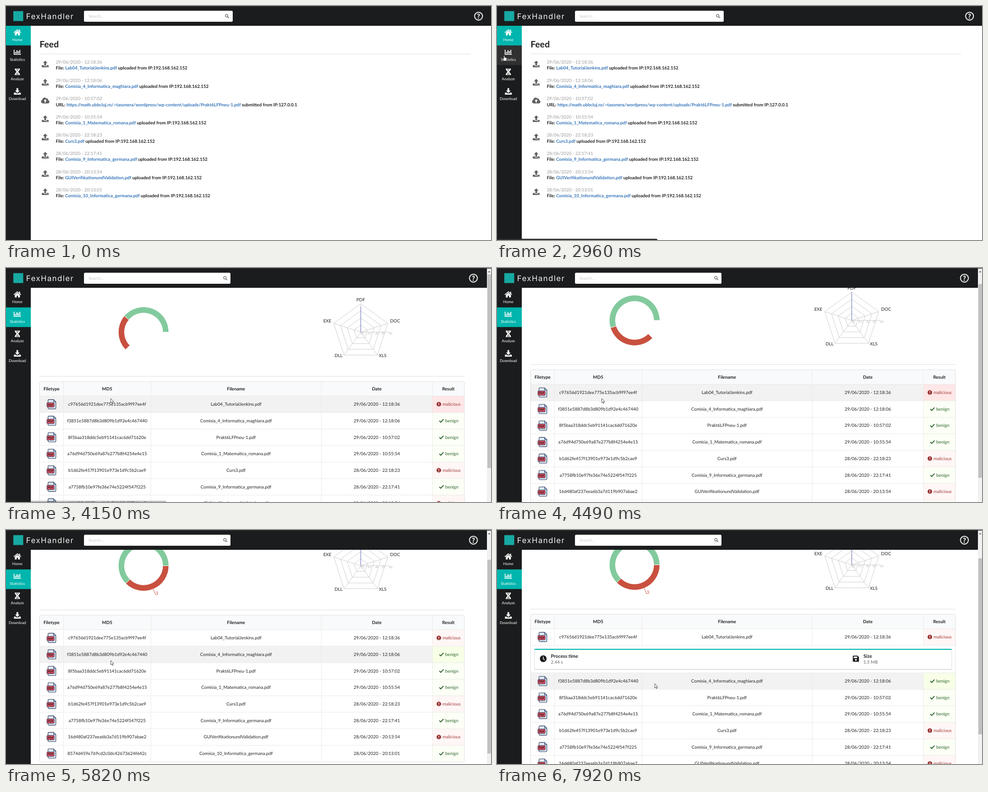
An HTML page for the animation above (8 s loop, 1076 by 520 pixels).

```html
<!DOCTYPE html>
<html lang="en">
<head>
<meta charset="utf-8">
<title>Feed and statistics</title>
<style>
html, body { margin: 0; width: 100%; height: 100%; overflow: hidden; background: #fff; }
svg { display: block; }
text { font: 9.9px Lato, sans-serif; fill: rgba(0,0,0,.87); text-rendering: geometricPrecision; }
.b { font-weight: 700; }
.m { text-anchor: middle; }
.e { text-anchor: end; }
.link { fill: #3675b8; }
.date { fill: rgba(0,0,0,.4); }
.side { font-size: 8.5px; fill: #fff; }
</style>
</head>
<body>
<svg id="stage" width="1076" height="520" viewBox="0 0 1076 520"></svg>
<script>
const LOOP = 8000, ROW = 36.7, TOP = 284.5, EXTRA = 61.2;
const HEAD = 44, SIDE = 55;
const GREEN = '#82ca9d', RED = '#c9503f', TEAL = '#00b5ad', DARK = '#1b1c1d';
const COLS = [127.5, 321.5, 699.5, 946];
const PIE = { x: 305.2, y: 142.5, r: 56, hole: 42.5 };
const NET = { x: 787, y: 142.5, r: 63 };

const files = [
  ['Lab04_TutorialJenkins.pdf', '29/06/2020 - 12:18:36', 'c97656d1921dee775e135acb9f97ee4f', 1],
  ['Comisia_4_Informatica_maghiara.pdf', '29/06/2020 - 12:18:06', 'f3851e5887d8b3d809b1d92e4c467440', 0],
  ['Prakt6LFPneu-1.pdf', '29/06/2020 - 10:57:02', '8f5baa318ddc5eb91141cac6dd71620e', 0],
  ['Comisia_1_Matematica_romana.pdf', '29/06/2020 - 10:55:54', 'a76d94d750e69a87e277b8f4254e4e15', 0],
  ['Curs3.pdf', '28/06/2020 - 22:18:23', 'b1d62fe457f13901e973e1d9c5b2cae9', 1],
  ['Comisia_9_Informatica_germana.pdf', '28/06/2020 - 22:17:41', 'a7758fb10e97fe36e74e5224f547f225', 0],
  ['GUIVerifikationundValidation.pdf', '28/06/2020 - 20:13:54', '16d480af237eea6b3a7d119b907abae2', 1],
  ['Comisia_10_Informatica_germana.pdf', '28/06/2020 - 20:13:01', '8574d459e769cd2c0dc42673624f642c', 0]
];

// time, x, y, pointer shape while heading to the next step
const moves = [
  [0, 780, 532, 'arrow'], [370, 776, 528, 'arrow'], [520, 729, 472, 'arrow'],
  [1300, 729, 472, 'arrow'], [1450, 332, 248, 'arrow'],
  [1700, 332, 248, 'arrow'], [2160, 62, 95, 'arrow'],
  [2460, 62, 95, 'arrow'], [2630, 16, 110, 'hand'],
  [3290, 16, 110, 'hand'], [3840, 232.5, 290, 'arrow'],
  [5860, 232.5, 290, 'arrow'], [6200, 249, 269.5, 'beam'],
  [6290, 249, 269.5, 'beam'], [6450, 254, 232.5, 'beam'],
  [7380, 254, 232.5, 'arrow'], [7910, 350, 341.5, 'arrow'], [8000, 350, 341.5, 'arrow']
];

// ---- markup helpers
const txt = (x, y, s, cls = '', more = '') => `<text x="${x}" y="${y}" class="${cls}" ${more}>${s}</text>`;
const box = (x, y, w, h, fill, more = '') => `<rect x="${x}" y="${y}" width="${w}" height="${h}" fill="${fill}" ${more}/>`;
const line = (x1, y1, x2, y2, c, more = '') => `<path d="M${x1} ${y1}L${x2} ${y2}" stroke="${c}" fill="none" ${more}/>`;
const at = (x, y, s, more = '') => `<g transform="translate(${x} ${y})" ${more}>${s}</g>`;
const EDGE = '#dededf', THIN = '#e9e9e9';

const tray = '<path d="M-7 2.6H-3V4.4H3V2.6H7Q7.6 2.6 7.6 3.2V6.6Q7.6 7.2 7 7.2H-7Q-7.6 7.2-7.6 6.6V3.2Q-7.6 2.6-7 2.6Z"/>';
const icon = {
  upload: tray + '<path d="M-1.9 3.2V-2.2H-5L0-7.6L5-2.2H1.9V3.2Z"/><path d="M3 5.8H6" stroke="#fff" stroke-width="1" stroke-dasharray="1.1 .9"/>',
  cloud: '<path d="M-5 6.5A4.3 4.3 0 0 1-6.3-1.8A5 5 0 0 1 2.6-4.6A3.3 3.3 0 0 1 6.6-.9A3.8 3.8 0 0 1 5.6 6.5Z"/><path d="M-1.2 4.4V.8H-3.6L0-3L3.6.8H1.2V4.4Z" fill="#fff"/>',
  home: '<path d="M-8 .4L0-6.2L8 .4" fill="none" stroke="#fff" stroke-width="1.7"/><path d="M-5.6.6L0-4L5.6.6V6.6H1.5V2.4H-1.5V6.6H-5.6ZM4-6.4H6V-1.5L4-3Z"/>',
  chart: '<path d="M-7.2-5.6V4.8H8" fill="none" stroke="#fff" stroke-width="1.7"/><path d="M-4 3V-.5M-.9 3V-4.4M2.2 3V-2.4M5.4 3V-5" stroke="#fff" stroke-width="2"/>',
  dna: '<path d="M-4.8-7C-4.8-1.4 4.8 1.4 4.8 7M4.8-7C4.8-1.4-4.8 1.4-4.8 7" fill="none" stroke="#fff" stroke-width="2.2"/><path d="M-5-6.3H5M-4-3.6H4M-4 3.6H4M-5 6.3H5" stroke="#fff" stroke-width="1.5"/>',
  download: tray + '<path d="M-1.9-7.4V-2H-5L0 3.6L5-2H1.9V-7.4Z"/>',
  search: '<circle cx="-1" cy="-1" r="2.9" fill="none" stroke="#707070" stroke-width="1.4"/><path d="M1.2 1.2L4 4" stroke="#707070" stroke-width="1.7"/>',
  bad: '<circle r="5" fill="#96302e"/><path d="M0-3V.7M0 1.8V3.2" stroke="#fff" stroke-width="1.5"/>',
  good: '<path d="M-4.6.2L-1.4 3.2L4.6-3.2" fill="none" stroke="#2c662d" stroke-width="2"/>',
  pdf: '<path d="M-6-10.3H4.5L9.6-5.2V8.6Q9.6 10.4 7.8 10.4H-6Q-7.8 10.4-7.8 8.6V-8.5Q-7.8-10.3-6-10.3Z" fill="#dfeafb" stroke="#22304a" stroke-width="1.1"/>'
    + '<path d="M4.5-10.3V-5.2H9.6Z" fill="#a9c8f2" stroke="#22304a" stroke-width=".9"/>'
    + box(-10.2, -3.4, 16.2, 9.8, '#dd5360', 'rx="1.4" stroke="#22304a" stroke-width="1"')
    + txt(-2.1, 3.8, 'PDF', 'b m', 'style="font-size:6.6px;fill:#1d1420"'),
  clock: '<circle r="7.5"/><path d="M0-4.8V.2L3 2.6" fill="none" stroke="#fff" stroke-width="1.5"/>',
  floppy: '<path d="M-6.8-5.6Q-6.8-6.8-5.6-6.8H3.6L6.8-3.6V5.6Q6.8 6.8 5.6 6.8H-5.6Q-6.8 6.8-6.8 5.6Z"/><path d="M-4.8-4.8H3V-1.4H-4.8Z" fill="#fff"/><circle cy="2.6" r="2" fill="#fff"/>'
};

// ---- feed page
function feedPage() {
  let s = txt(74.6, 92, 'Feed', 'b', 'style="font-size:19.7px"') + line(74.5, 106.5, 1030, 106.5, EDGE);
  files.forEach(([name, date], i) => {
    const y = i * 40.55, url = i === 2;
    const label = url ? 'https://math.ubbcluj.ro/~tasonera/wordpress/wp-content/uploads/' + name : name;
    s += at(87, 129 + y, url ? icon.cloud : icon.upload, 'fill="#5f6061"')
      + txt(110.4, 128.2 + y, date, 'date')
      + txt(110.4, 141.4 + y, `${url ? 'URL' : 'File'}: <tspan class="link">${label}</tspan> ${url
        ? 'submitted from IP:127.0.0.1' : 'uploaded from IP:192.168.162.152'}`, 'b');
  });
  return s;
}

// ---- statistics page
const polar = (c, r, deg) => [c.x + r * Math.cos(deg * Math.PI / 180), c.y - r * Math.sin(deg * Math.PI / 180)];

function radar() {
  const spokes = [90, 18, -54, -126, 162];
  let s = '';
  for (let i = 1; i <= 4; i++)
    s += `<polygon points="${spokes.map(a => polar(NET, NET.r * i / 4, a)).join(' ')}" fill="none" stroke="#ccc"/>`;
  spokes.forEach((a, i) => {
    s += line(NET.x, NET.y, ...polar(NET, NET.r, a), '#ccc');
    const [x, y] = polar(NET, NET.r + 5.6, a);
    s += txt(x, y, ['PDF', 'DOC', 'XLS', 'DLL', 'EXE'][i], ['m', '', '', 'e', 'e'][i]);
  });
  s += line(NET.x, NET.y, NET.x + NET.r, NET.y, '#ccc');
  for (let i = 0; i <= 4; i++) {
    const x = NET.x + i * NET.r / 4;
    s += txt(x, NET.y, i * 2, '', `transform="rotate(90 ${x} ${NET.y})" style="fill:#c4c4c4"`);
  }
  return s + `<path id="spike" stroke="#8a90cc" stroke-width="1.3"/>`;
}

const pieLabel = (deg, s, color, cls) => {
  const [x, y] = polar(PIE, 70, deg);
  return line(...polar(PIE, 56, deg), x, y, color) + txt(x, y, s, cls, `style="fill:${color}"`);
};

function tableRow([name, date, hash, bad], i) {
  const y = TOP + i * ROW, base = y + 21.6, mid = y + 18.2;
  const ink = `style="fill:${bad ? '#9f3a38' : '#2c662d'}"`;
  return box(74.5, y, 871.5, ROW, '#fff', `id="row${i}"`) + box(946, y, 71, ROW, '#fff', `id="res${i}"`)
    + at(101, mid, icon.pdf)
    + txt(224.4, base, hash, 'm') + txt(510.3, base, name, 'm') + txt(822.6, base, date, 'm')
    + (bad ? at(960.3, mid, icon.bad) + txt(968.4, base, 'malicious', '', ink)
           : at(966, mid, icon.good) + txt(974.4, base, 'benign', '', ink))
    + COLS.map(x => line(x, y, x, y + ROW, THIN)).join('')
    + line(74.5, y, 1017, y, THIN);
}

function fact(x, glyph, tx, title, value) {
  return at(x, 351, glyph, `fill="${DARK}"`)
    + txt(tx, 349.2, title, 'b', 'style="font-size:10.6px"')
    + txt(tx, 361.6, value, '', 'style="fill:rgba(0,0,0,.6)"');
}

function statsPage() {
  const heads = [[101, 'Filetype'], [224.4, 'MD5'], [510.3, 'Filename'], [822.6, 'Date'], [981.5, 'Result']];
  return `<path id="good" fill="${GREEN}" stroke="#fff"/><path id="bad" fill="${RED}" stroke="#fff"/>`
    + `<g id="labels">${pieLabel(112.5, 5, GREEN, 'e')}${pieLabel(292.5, 3, RED, '')}</g>`
    + radar()
    + line(74.5, 240.7, 1017, 240.7, EDGE)
    + box(74.5, 252.3, 942.5, 32.2, '#f9fafb', 'rx="2.8"')
    + heads.map(([x, s]) => txt(x, 271.6, s, 'b m')).join('')
    + COLS.map(x => line(x, 252.3, x, TOP, THIN)).join('')
    + tableRow(files[0], 0)
    + `<g id="detail">${line(74.5, TOP + ROW, 1017, TOP + ROW, THIN)}<g id="card">`
    + box(83, 330.4, 926, 45.6, '#bcbdbd', 'rx="2.8" opacity=".55"')
    + box(83, 329.5, 926, 45, '#fff', 'rx="2.8" stroke="#d9d9da"')
    + `<path d="M82.6 331.2Q82.8 328.9 85.4 328.9H1006.6Q1009.2 328.9 1009.4 331.2Z" fill="${TEAL}"/>`
    + fact(102.6, icon.clock, 119.6, 'Process time', '2.44 s')
    + fact(796.2, icon.floppy, 813, 'Size', '1.5 MB') + '</g></g>'
    + `<g id="rest">${files.slice(1).map((f, i) => tableRow(f, i + 1)).join('')}</g>`
    + box(74.5, 252.3, 942.5, 0, 'none', `id="frame" rx="2.8" stroke="${EDGE}"`);
}

// ---- shell
function shell() {
  const items = [['home', 'Home'], ['chart', 'Statistics'], ['dna', 'Analyze'], ['download', 'Download']];
  return box(0, 0, 1076, HEAD, DARK) + box(0, 0, 1076, 1.3, '#303135') + box(0, HEAD, SIDE, 520 - HEAD, DARK)
    + box(0, HEAD, SIDE, 43.6, TEAL, 'id="active"') + box(0, HEAD + 43.6, SIDE, 43.6, '#fff', 'id="hover"')
    + items.map(([k, s], i) => at(25.2, 59 + i * 43.6, icon[k], 'fill="#fff"')
      + txt(25.2, 78 + i * 43.6, s, 'm side')).join('')
    + box(16.2, 11.4, 22, 22, '#17a9a3')
    + txt(44.6, 29, 'FexHandler', '', 'style="font:17px Inter,sans-serif;letter-spacing:1.5px;fill:#f4f4f4"')
    + box(173, 10.6, 330, 24.4, '#fff', 'id="field" rx="2.8"')
    + txt(183, 26.2, 'Search...', '', 'style="font-size:9.2px;fill:#c8c8c9"')
    + at(490.6, 22.6, icon.search, 'id="lens"')
    + at(1048.4, 22.6, '<circle r="8.8" fill="none" stroke="#e4e4e4" stroke-width="2.2"/>'
      + txt(0, 5.1, '?', 'b m', 'style="font-size:14.5px;fill:#e4e4e4;stroke:#e4e4e4;stroke-width:.6"'), 'id="help"')
    + `<g id="bar">${box(1067, 1.3, 9, 519, '#f1f1f1')}<path d="M1069.4 9.4L1072 6.4L1074.6 9.4Z" fill="#505050"/>`
    + box(1068, 14, 8, 431, '#c1c1c1', 'id="thumb"') + '</g>'
    + '<path id="status" d="M0 517.2H353Q356 517.2 356 520H0Z" fill="#2d2e31"/>';
}

const pointers = `<g id="arrow"><path d="M0 0V9.6L2.2 7.7L3.6 11L5.2 10.3L3.8 7.1H6.8Z" fill="#fff" stroke="#222" stroke-width=".8"/></g>
<g id="hand"><path d="M-1 .4Q0-.8 1 .4V4L5 5Q5.8 5.4 5.6 6.6L4.6 12H-.8L-3.2 7.8Q-3.4 6.2-1.8 6.8L-1 7.6Z" fill="#fff" stroke="#222" stroke-width=".8"/></g>
<g id="beam"><path d="M-1.6-4.5H1.6M-1.6 4.5H1.6M0-4.5V4.5" stroke="#222" stroke-width=".9"/></g>`;

document.getElementById('stage').innerHTML =
  `<g id="feed">${feedPage()}</g><g id="stats">${statsPage()}</g>${shell()}${pointers}`;

// ---- motion
const $ = {};
document.querySelectorAll('[id]').forEach(n => $[n.id] = n);
const set = (id, k, v) => $[id].setAttribute(k, v);
const show = (id, on) => set(id, 'display', on ? 'inline' : 'none');
const move = (id, x, y) => set(id, 'transform', `translate(${x} ${y})`);
const ramp = (t, a, b) => Math.min(1, Math.max(0, (t - a) / (b - a)));
const smooth = p => p * p * (3 - 2 * p);
const step = (t, a, b) => smooth(ramp(t, a, b));

// cubic-bezier(.25, .1, .25, 1)
function ease(p) {
  let lo = 0, hi = 1, u = p;
  for (let i = 0; i < 24; i++) {
    u = (lo + hi) / 2;
    const x = .75 * u * (1 - u) + u * u * u;
    if (x < p) lo = u; else hi = u;
  }
  return p >= 1 ? 1 : .3 * u * (1 - u) * (1 - u) + 3 * u * u * (1 - u) + u * u * u;
}

function sector(a, b) {
  const big = b - a > 180 ? 1 : 0;
  return `M${polar(PIE, PIE.r, a)}A${PIE.r} ${PIE.r} 0 ${big} 0 ${polar(PIE, PIE.r, b)}`
    + `L${polar(PIE, PIE.hole, b)}A${PIE.hole} ${PIE.hole} 0 ${big} 1 ${polar(PIE, PIE.hole, a)}Z`;
}

function pointerAt(t) {
  let i = 0;
  while (i < moves.length - 2 && moves[i + 1][0] <= t) i++;
  const [t0, x0, y0, kind] = moves[i], [t1, x1, y1, next] = moves[i + 1];
  const p = step(t, t0, t1), x = x0 + (x1 - x0) * p, y = y0 + (y1 - y0) * p;
  return { x, y, kind: x < SIDE ? 'hand' : p > .8 ? next : kind === 'hand' ? 'arrow' : kind };
}

function draw(t) {
  const stats = t >= 3210, open = t >= 6530;
  const p = pointerAt(t);
  for (const k of ['arrow', 'hand', 'beam']) show(k, k === p.kind && t >= 370);
  move(p.kind, p.x, p.y);

  show('feed', !stats);
  show('stats', stats);
  show('bar', stats);
  set('active', 'y', stats ? HEAD + 43.6 : HEAD);
  set('hover', 'opacity', stats ? 0 : .09 * ramp(t, 2570, 2670));
  set('status', 'opacity', ramp(t, 2780, 2950) * (1 - ramp(t, 4040, 4200)));
  set('field', 'width', stats ? 325 : 330);
  move('lens', stats ? 486.6 : 490.6, 22.6);
  move('help', stats ? 1037 : 1048.4, 22.6);
  if (!stats) return;

  const scroll = 65 * (step(t, 4432, 4568) - step(t, 4650, 4800) + step(t, 5660, 5840));
  const extra = open ? EXTRA : 0, full = 610 + extra;
  move('stats', 0, -scroll);
  set('thumb', 'y', 14 + scroll * 505 / full);
  set('thumb', 'height', 505 * 520 / full);

  const sweep = 360 * ease(ramp(t, 3610, 5110));
  set('good', 'd', sweep ? sector(0, sweep * 5 / 8) : '');
  set('bad', 'd', sweep ? sector(sweep * 5 / 8, sweep) : '');
  show('labels', t >= 5110);
  set('spike', 'd', `M${NET.x} ${NET.y}v${-NET.r * ease(ramp(t, 3210, 4710))}`);

  const py = p.y + scroll;
  files.forEach((f, i) => {
    const y = TOP + i * ROW + (i ? extra : 0);
    const over = p.x > 74.5 && p.x < 1017 && py >= y && py < y + ROW;
    set('row' + i, 'fill', over ? '#f2f2f2' : '#fff');
    set('res' + i, 'fill', f[3] ? (over ? '#ffe7e7' : '#fff6f6') : over ? '#f7ffe6' : '#fcfff5');
  });

  show('detail', open);
  set('card', 'opacity', ramp(t, 6480, 6720));
  move('card', 0, open && py > 329 && py < 375 ? -2 : 0);
  move('rest', 0, extra);
  set('frame', 'height', 325.8 + extra);
}

const start = performance.now();
(function tick() {
  draw((performance.now() - start) % LOOP);
  requestAnimationFrame(tick);
})();
</script>
</body>
</html>
```
